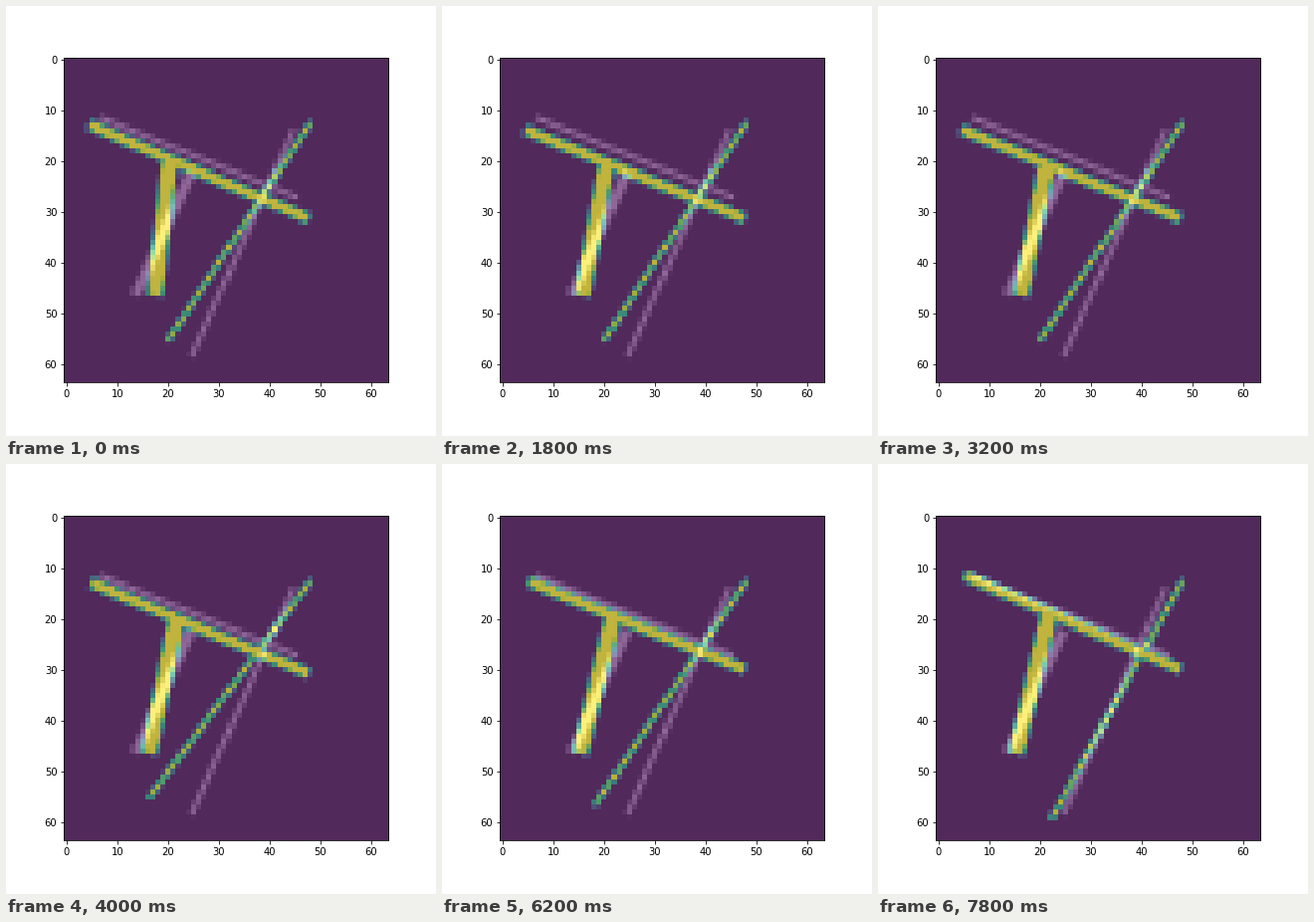
A matplotlib script for the animation above (8 s loop, 432x432 px).

```python
import numpy as np
import matplotlib.pyplot as plt
from matplotlib.animation import FuncAnimation

SIZE = 64
FRAMES, STEP_MS = 40, 200

plt.rcParams.update({"font.family": "DejaVu Sans", "font.size": 10})

rows, cols = np.mgrid[0:SIZE, 0:SIZE]


def ramp(step, start, end):
    return np.clip((step - start) / (end - start), 0, 1)


def ease(step, start, end):
    t = ramp(step, start, end)
    return t * t * (3 - 2 * t)


def bump(step, center, width):
    return np.exp(-((step - center) / width) ** 2)


def stroke(x0, y0, x1, y1, reach):
    """Soft-edged straight stroke with flat ends, in cells, values 0 to 1."""
    length = np.hypot(x1 - x0, y1 - y0)
    ux, uy = (x1 - x0) / length, (y1 - y0) / length
    along = (cols - x0) * ux + (rows - y0) * uy
    across = np.abs((rows - y0) * ux - (cols - x0) * uy)
    over = np.maximum(np.maximum(-along, along - length), 0)
    return np.clip(reach - across, 0, 1) * np.clip(1 - over, 0, 1)


def goal():
    return np.max([stroke(7, 11.6, 45, 27, 1.0),
                   stroke(24.3, 22.7, 13.8, 45.9, 1.5),
                   stroke(44.5, 14.2, 24.8, 58, 1.0)], axis=0)


def guess(step):
    # The bar sinks, rises and dips once more at its left end.
    rise = ease(step, 15, 26)
    left = 4.9 + 0.6 * rise
    left_y = 13 + ease(step, 0, 9) - 2.4 * rise + 1.1 * bump(step, 31, 3)
    right_y = 31.2 - 1.4 * rise
    bar = stroke(left, left_y, 47.3, right_y, 1.55)

    # The stem hangs from the bar.
    top = 20.4 + 1.5 * ease(step, 4, 24)
    top_y = np.interp(top, [left, 47.3], [left_y, right_y])
    foot = (17.5 - 1.7 * ease(step, 0, 9) + 0.7 * bump(step, 18, 4)
            - 0.4 * ease(step, 20, 31))
    stem = stroke(top, top_y, foot, 46, 2.1)

    # The slash swings left, then speeds up to the right.
    swing = ramp(step, 20, 39) ** 2
    tip = 20.2 - 3.8 * ease(step, 16, 20) + 6 * swing
    slash = stroke(47.9, 12.7, tip, 55 + 4 * swing, 1.0)
    return np.max([bar, stem, slash], axis=0)


fig = plt.figure(figsize=(6, 6), dpi=72, facecolor="white")
fig.subplots_adjust(left=0.125, right=0.9, bottom=0.125, top=0.88)
ax = fig.add_subplot()
image = ax.imshow(guess(0), cmap="viridis", vmin=0, vmax=1,
                  interpolation="nearest")
ax.imshow(goal(), cmap="gray", vmin=-2 / 3, vmax=1, alpha=0.4,
          interpolation="nearest")


def update(step):
    image.set_data(guess(step))
    return [image]


anim = FuncAnimation(fig, update, frames=FRAMES, interval=STEP_MS,
                     repeat=True, repeat_delay=0, blit=False)
plt.show()
```
